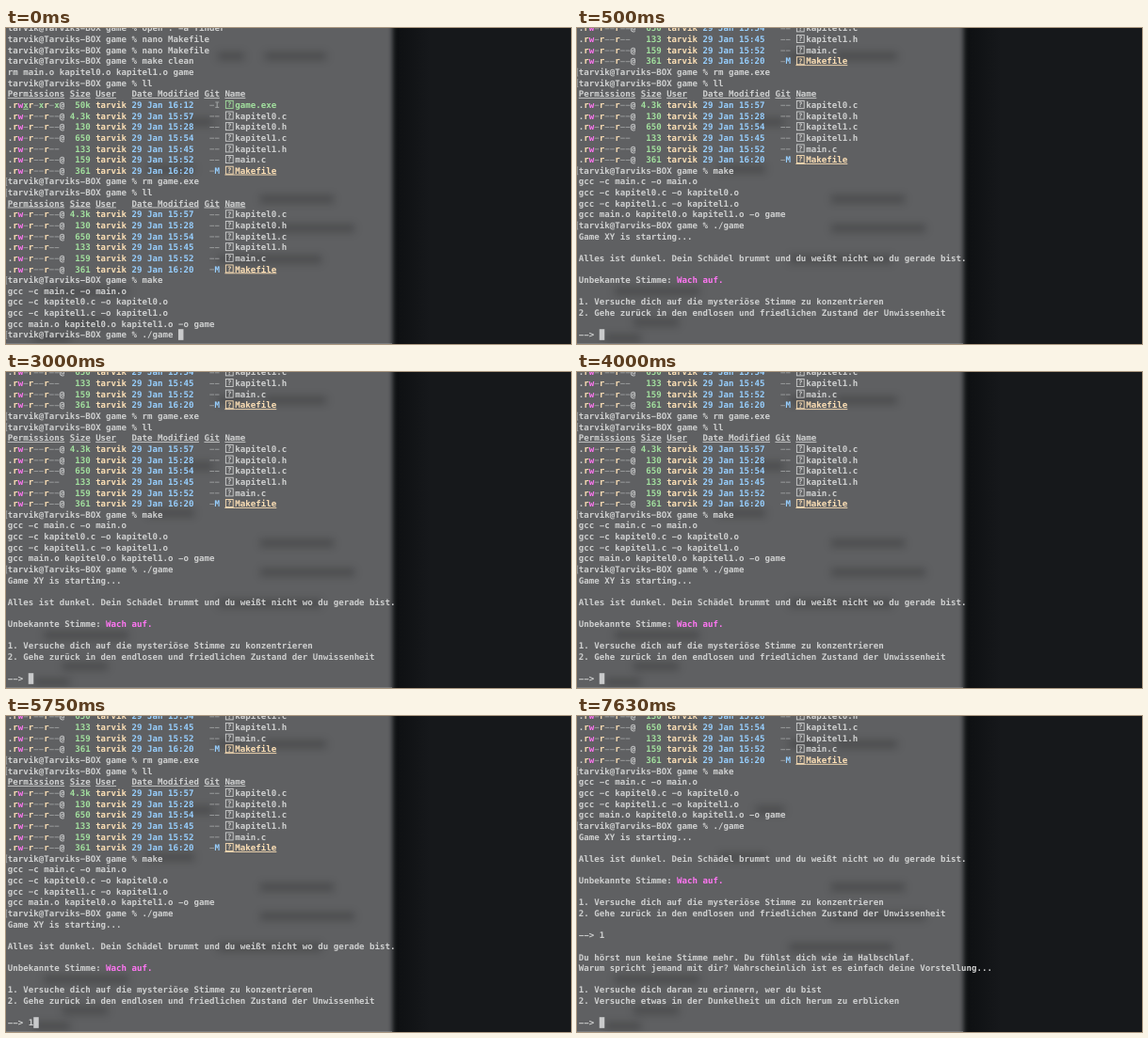
These frames come from a looping animation (600 by 336 pixels, 8 s). An HTML page with a canvas:

```html
<!DOCTYPE html>
<html lang="de">
<head>
<meta charset="utf-8">
<title>Terminal</title>
<style>
html, body { margin: 0; width: 600px; height: 336px; overflow: hidden; background: #14171a; }
canvas { display: block; }
</style>
</head>
<body>
<canvas id="stage" width="600" height="336"></canvas>
<script>
const ctx = document.getElementById('stage').getContext('2d');
const LOOP = 8000, CELL = 5.49, ROW = 11.64, LEFT = 1.8, LAST_TOP = 320.2;
const WHITE = '#cfd0d0', DIM = '#989a9b', CREAM = '#fde0b6', PINK = '#ff76f3',
      GREEN = '#a2e09e', BLUE = '#97cfff';

// A line is a list of segments placed by column.
const seg = (col, text, color = WHITE, underline = false) => ({ col, text, color, underline });
const plain = text => [seg(0, text)];
const prompt = (command, marked = true) =>
  Object.assign(plain('tarvik@Tarviks-BOX game % ' + command), { marked });

const header = [[0, 'Permissions'], [12, 'Size'], [17, 'User'], [24, 'Date Modified'], [38, 'Git'], [42, 'Name']]
  .map(([col, text]) => seg(col, text, WHITE, true));

const permColors = { r: CREAM, w: PINK, x: GREEN, '-': DIM };

function file(size, time, name, perms = '.rw-r--r--@', git = '--') {
  const special = name === 'Makefile';
  const color = special ? CREAM : name.endsWith('.exe') ? GREEN : WHITE;
  const line = [...perms].map((c, i) =>
    seg(i, c, permColors[c] || WHITE, c === 'x' && i === 3));
  line.push(
    seg(12, size.padStart(4), GREEN),
    seg(17, 'tarvik', CREAM),
    seg(24, '29 Jan ' + time, BLUE),
    seg(39, git[0], DIM),
    seg(40, git[1], git[1] === 'M' ? BLUE : DIM),
    seg(44, name, color, special));
  line.icon = { color, underline: special };
  return line;
}

const files = [
  file('4.3k', '15:57', 'kapitel0.c'),
  file('130', '15:28', 'kapitel0.h'),
  file('650', '15:54', 'kapitel1.c'),
  file('133', '15:45', 'kapitel1.h', '.rw-r--r--'),
  file('159', '15:52', 'main.c'),
  file('361', '16:20', 'Makefile', '.rw-r--r--@', '-M')
];

const shell = [
  prompt('open . -a finder', false),
  prompt('nano Makefile', false),
  prompt('nano Makefile', false),
  prompt('make clean', false),
  plain('rm main.o kapitel0.o kapitel1.o game'),
  prompt('ll', false),
  header,
  file('50k', '16:12', 'game.exe', '.rwxr-xr-x@', '-I'),
  ...files,
  prompt('rm game.exe'),
  prompt('ll'),
  header,
  ...files,
  prompt('make'),
  plain('gcc -c main.c -o main.o'),
  plain('gcc -c kapitel0.c -o kapitel0.o'),
  plain('gcc -c kapitel1.c -o kapitel1.o'),
  plain('gcc main.o kapitel0.o kapitel1.o -o game'),
  prompt('./game ')
];

const wake = [
  plain('Game XY is starting...'),
  plain(''),
  plain('Alles ist dunkel. Dein Schädel brummt und du weißt nicht wo du gerade bist.'),
  plain(''),
  [seg(0, 'Unbekannte Stimme:'), seg(19, 'Wach auf.', PINK)],
  plain(''),
  plain('1. Versuche dich auf die mysteriöse Stimme zu konzentrieren'),
  plain('2. Gehe zurück in den endlosen und friedlichen Zustand der Unwissenheit'),
  plain('')
];

const doze = [
  plain(''),
  plain('Du hörst nun keine Stimme mehr. Du fühlst dich wie im Halbschlaf.'),
  plain('Warum spricht jemand mit dir? Wahrscheinlich ist es einfach deine Vorstellung...'),
  plain(''),
  plain('1. Versuche dich daran zu erinnern, wer du bist'),
  plain('2. Versuche etwas in der Dunkelheit um dich herum zu erblicken'),
  plain('')
];

const ask = plain('--> ');
const chosen = [...shell, ...wake, plain('--> 1')];
const screens = [
  [0, shell],
  [130, [...shell, plain('')]],
  [380, [...shell, ...wake, ask]],
  [5380, chosen],
  [6630, [...chosen, plain('')]],
  [6880, [...chosen, ...doze, ask]]
];

function drawBackground() {
  const right = ctx.createLinearGradient(410, 0, 450, 0);
  right.addColorStop(0, '#0d0f11');
  right.addColorStop(1, '#16181b');
  ctx.fillStyle = right;
  ctx.fillRect(0, 0, 600, 336);

  // Blurred page behind the translucent window
  ctx.filter = 'blur(2.5px)';
  ctx.fillStyle = '#5f6062';
  ctx.fillRect(-20, -20, 430.5, 376);
  ctx.filter = 'blur(4px)';
  ctx.fillStyle = 'rgba(0,0,0,.22)';
  for (const [x, y, w] of [[225, 30, 28], [275, 30, 65], [190, 100, 30], [150, 150, 50],
                           [270, 182, 78], [270, 213, 100], [225, 246, 110],
                           [40, 280, 90], [60, 313, 48], [30, 330, 38]])
    ctx.fillRect(x, y - 4, w, 8);
  ctx.filter = 'none';

  ctx.fillStyle = 'rgba(150,152,154,.5)';
  ctx.fillRect(0, 335, 410, 1);
}

const columnX = col => LEFT + col * CELL;

function drawUnderline(x, top, width, color) {
  ctx.fillStyle = color;
  ctx.fillRect(x, top + 10, width, 0.9);
}

function drawIcon({ color, underline }, top) {
  const x = columnX(42) + 1;
  ctx.strokeStyle = ctx.fillStyle = color;
  ctx.lineWidth = 0.9;
  ctx.strokeRect(x, top + 1.6, 7.8, 8);
  ctx.font = 'bold 7.5px "DejaVu Sans Mono", monospace';
  ctx.fillText('?', x + 1.65, top + 8.4);
  if (underline) drawUnderline(columnX(42), top, 2 * CELL, color);
}

// Hyphens are drawn as bars that nearly fill their cell.
function drawChar(c, x, top) {
  if (c === '-') ctx.fillRect(x + 0.4, top + 6, CELL - 0.8, 1);
  else ctx.fillText(c, x, top + 9.2);
}

function drawLine(line, top) {
  ctx.font = 'bold 9.12px "DejaVu Sans Mono", monospace';
  for (const { col, text, color, underline } of line) {
    ctx.fillStyle = color;
    [...text].forEach((c, i) => drawChar(c, columnX(col + i), top));
    if (underline) drawUnderline(columnX(col), top, text.length * CELL, color);
  }
  if (line.icon) drawIcon(line.icon, top);
  if (line.marked) {
    ctx.fillStyle = '#a0a1a2';
    ctx.fillRect(0, top + 2, 0.7, 8.5);
    ctx.fillRect(0, top + 2, 1.4, 0.7);
    ctx.fillRect(0, top + 9.8, 1.4, 0.7);
  }
}

function drawScreen(lines) {
  drawBackground();
  ctx.textRendering = 'geometricPrecision';
  lines.forEach((line, i) => {
    const top = LAST_TOP - (lines.length - 1 - i) * ROW;
    if (top > -ROW) drawLine(line, top);
  });
  ctx.fillStyle = '#c9cacb';
  ctx.fillRect(columnX(lines.at(-1)[0].text.length), LAST_TOP, CELL, ROW);
}

let shown;
function tick(now) {
  const time = now % LOOP;
  const [, lines] = screens.findLast(([start]) => start <= time);
  if (lines !== shown) drawScreen(shown = lines);
  requestAnimationFrame(tick);
}
tick(0);
</script>
</body>
</html>
```
